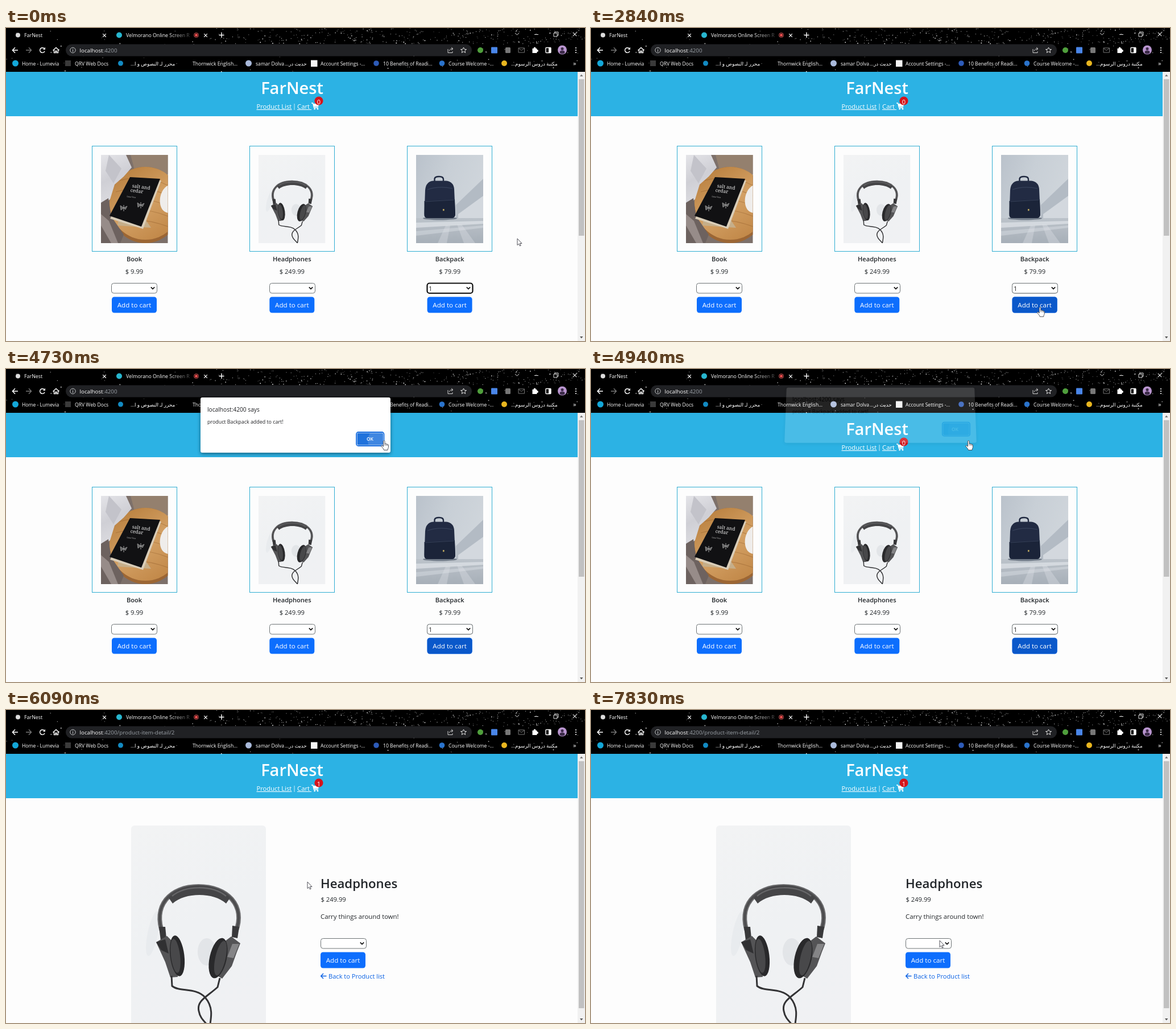
These frames come from a looping animation (1018 by 550 pixels, 8 s). An HTML page with a canvas:

```html
<!DOCTYPE html>
<html lang="en">
<head>
<meta charset="utf-8">
<title>FarNest</title>
<style>
html, body { margin: 0; width: 100%; height: 100%; overflow: hidden; background: #fdfdfd; }
canvas { display: block; }
</style>
</head>
<body>
<canvas id="stage" width="1018" height="550"></canvas>
<script>
const W = 1018, H = 550, LOOP = 8000;
const SANS = '"Open Sans", "Noto Sans", sans-serif';
const SERIF = '"Noto Serif", "Liberation Serif", serif';
const BLUE = '#0d6efd', DARK_BLUE = '#0a58ca';
const stage = document.getElementById('stage').getContext('2d');
let c = stage;

// ---- drawing helpers ----
function rect(x, y, w, h, fill) {
  c.fillStyle = fill;
  c.fillRect(x, y, w, h);
}
function round(x, y, w, h, r, fill, stroke, lw = 1) {
  c.beginPath();
  c.roundRect(x, y, w, h, r);
  if (fill) { c.fillStyle = fill; c.fill(); }
  if (stroke) { c.strokeStyle = stroke; c.lineWidth = lw; c.stroke(); }
}
function oval(x, y, rx, ry, fill, rot = 0) {
  c.beginPath();
  c.ellipse(x, y, rx, ry, rot, 0, Math.PI * 2);
  c.fillStyle = fill;
  c.fill();
}
function dot(x, y, r, fill) { oval(x, y, r, r, fill); }
function ring(x, y, r, color, lw = 1) {
  c.beginPath();
  c.arc(x, y, r, 0, Math.PI * 2);
  c.strokeStyle = color;
  c.lineWidth = lw;
  c.stroke();
}
function shape(d, fill, stroke, lw = 1) {
  const p = new Path2D(d);
  if (fill) { c.fillStyle = fill; c.fill(p); }
  if (stroke) { c.strokeStyle = stroke; c.lineWidth = lw; c.stroke(p); }
}
function text(s, x, y, size, fill, { weight = 400, align = 'left', family = SANS, dir = 'ltr' } = {}) {
  c.font = `${weight} ${size}px ${family}`;
  c.textAlign = align;
  c.direction = dir;
  c.fillStyle = fill;
  c.fillText(s, x, y);
  return c.measureText(s).width;
}
function blend(x0, y0, x1, y1, ...colors) {
  const g = c.createLinearGradient(x0, y0, x1, y1);
  colors.forEach((col, i) => g.addColorStop(i / (colors.length - 1), col));
  return g;
}
function at(x, y, sx, sy, draw) {
  c.save();
  c.translate(x, y);
  c.scale(sx, sy);
  draw();
  c.restore();
}
function sheet() {
  const cv = document.createElement('canvas');
  cv.width = W;
  cv.height = H;
  return cv;
}
function paint(cv, draw) {
  const old = c;
  c = cv.getContext('2d');
  c.clearRect(0, 0, W, H);
  draw();
  c = old;
  return cv;
}
function random(seed) {
  return () => (seed = (seed * 16807) % 2147483647) / 2147483647;
}

// ---- browser frame ----
function stars() {
  const rnd = random(4217);
  for (let i = 0; i < 430; i++) {
    const right = i < 330;
    const x = right ? 370 + rnd() * 648 : rnd() * W;
    const y = right ? rnd() * 27 : rnd() * 76;
    const s = rnd() < 0.2 ? 1.6 : 1;
    c.globalAlpha = 0.3 + rnd() * 0.65;
    rect(x, y, s, s, '#fff');
  }
  c.globalAlpha = 1;
}
function cross(x, y, r, color = '#fff') {
  shape(`M${x - r} ${y - r}L${x + r} ${y + r}M${x + r} ${y - r}L${x - r} ${y + r}`, null, color, 1.2);
}
function browser() {
  rect(0, 0, W, 77, '#000');
  stars();

  dot(21, 12.5, 4, '#dcdcdc');
  text('FarNest', 32, 16, 8.9, '#fff');
  cross(173, 13, 2.8);
  dot(199, 12.5, 5, '#27b6cf');
  text('Velmorano Online Screen R', 211, 16, 8.8, blend(285, 0, 324, 0, '#fff', 'rgba(255,255,255,.25)'));
  ring(334.5, 12.5, 4, '#e25a5a');
  dot(334.5, 12.5, 2.5, '#ef4f4f');
  cross(351, 13, 2.8);
  shape('M374.5 12.5H383.5M379 8V17', null, '#fff', 1.4);
  shape('M895 9L898.5 12L902 9M929 11.5H936', null, '#ddd', 1);
  shape('M963 9H969V15H963ZM965 9V7H971V13H969', null, '#ddd', 1);
  cross(1000, 11, 3.2, '#ddd');

  shape('M21 39H11.5M16 34.3L11.4 39L16 43.7', null, '#fff', 1.5);
  shape('M35 39H44.5M40 34.3L44.6 39L40 43.7', null, '#777', 1.3);
  c.beginPath();
  c.arc(64, 39, 4.3, 0.4, 5.5);
  c.strokeStyle = '#fff';
  c.lineWidth = 1.5;
  c.stroke();
  shape('M69 33.8V38H64.8Z', '#fff');
  shape('M82.5 39.5L88 34.5L93.5 39.5M84.5 38.5V43.5H87V40.5H89V43.5H91.5V38.5', null, '#fff', 1.4);

  round(105, 28.5, 714, 21, 10.5, '#202124');
  ring(117.5, 39, 4.7, '#c4c7c9');
  rect(117, 38.3, 1.1, 3.6, '#c4c7c9');
  rect(117, 36.2, 1.1, 1.2, '#c4c7c9');
  shape('M777 37V43.5H785V41M779.5 40.5C780 37.5 782 36.5 785 36.5M783 34L786 36.5L783 39', null, '#d0d0d0', 1);
  shape('M804.5 34L806 37.3L809.5 37.6L806.8 39.9L807.7 43.4L804.5 41.5L801.3 43.4L802.2 39.9L799.5 37.6L803 37.3Z', null, '#e0e0e0', 1);

  dot(834, 39, 5, '#4f9f3c');
  round(853, 33.5, 11, 11, 1, '#4a86e8');
  round(878, 34, 9, 10, 1.5, '#777');
  shape('M901 35H911.5V43H901ZM901 35.5L906.2 39.5L911.5 35.5', null, '#777', 1);
  rect(925.5, 36, 8, 8, '#fff');
  dot(929.5, 35.5, 1.9, '#fff');
  dot(934, 40, 1.9, '#fff');
  round(949, 34.5, 9, 9, 1, null, '#fff', 1.4);
  rect(954, 34.5, 4, 9, '#fff');
  dot(978, 38.5, 8, '#b995cf');
  dot(978, 36.5, 2.5, '#3c2b49');
  oval(978, 42.5, 4.5, 3, '#3c2b49');
  [35, 39, 43].forEach(y => dot(1002, y, 1.1, '#fff'));

  const mark = (s, x) => text(s, x, 65.5, 8.6, '#fff');
  const arabic = (s, x) => text(s, x, 65.5, 8.8, '#fff', { dir: 'rtl' });
  dot(16.5, 62, 5.5, '#13a7d8');
  mark('Home - Lumevia', 28);
  rect(104, 57, 10, 10, '#3a3a3a');
  mark('QRV Web Docs', 121);
  dot(201.5, 62, 4.5, '#128ac2');
  arabic('محرر لـ النصوص و ا...', 219);
  mark('Thornwick English...', 328);
  dot(426.5, 62, 5.5, '#a9b9da');
  mark('samar Dolva', 439);
  arabic('حديث در...', 490);
  rect(536, 56.5, 11.5, 11.5, '#f4f4f4');
  mark('Account Settings -...', 553);
  dot(651, 62, 4.8, '#2d5bb8');
  mark('10 Benefits of Readi...', 663);
  dot(766.5, 62, 4.8, '#2a73cc');
  mark('Course Welcome -...', 778);
  dot(876, 62, 5, '#e9b61f');
  arabic('مكتبة دروس الرسوم...', 888);
  text('»', 997, 66, 11, '#fff');
}

// ---- pictures ----
function clipBox(w, h) {
  c.beginPath();
  c.rect(0, 0, w, h);
  c.clip();
}
function bookPhoto() {
  clipBox(117.5, 155);
  rect(0, 0, 118, 155, '#7d706a');
  shape('M52 0H118V34L60 30Z', '#94806e');
  oval(78, 88, 63, 67, '#9c6634');
  oval(78, 85, 63, 64, blend(30, 30, 110, 150, '#b9803f', '#d3a064', '#c08646'));
  for (let i = 0; i < 5; i++) shape(`M${22 + i * 4} ${48 + i * 17}Q75 ${30 + i * 20} 118 ${54 + i * 18}`, null, 'rgba(150,95,45,.45)', 1.2);
  shape('M0 0H44L54 22L40 38L24 52L16 78L0 90Z', blend(0, 0, 40, 80, '#e4e4e8', '#cfcfd5', '#dedee2'));
  shape('M14 0L36 24L22 50L8 28Z', '#c3c3ca');
  shape('M0 84L13 76L18 108L40 140L34 155H0Z', '#6d625f');
  shape('M0 104L14 116L30 155H18L0 124Z', '#978c89');
  oval(121, 77, 17, 25, '#efedeb', 0.2);
  shape('M40 60L84 122L88 128L29 124Z', '#c6ae89');
  shape('M54 42L106 45L74 130L16 112Z', '#d9cdb8');
  shape('M51 39L104 42L71 126L15 107Z', '#111113');
  c.save();
  c.translate(55, 53);
  c.rotate(0.13);
  text('salt and', 0, 4, 8.5, '#eee', { family: SERIF });
  text('cedar', -2, 12, 8.5, '#eee', { family: SERIF });
  text('Lena Voss', -7, 22, 3.4, '#ccc', { family: SERIF });
  c.restore();
  [[40, 93], [70, 88]].forEach(([x, y]) => {
    shape(`M${x - 6} ${y - 4}L${x} ${y}L${x + 6} ${y - 3}L${x + 3} ${y + 3}L${x} ${y}L${x - 5} ${y + 4}Z`, '#666', '#aaa', 0.7);
    shape(`M${x} ${y - 5}V${y + 6}`, null, '#ccc', 0.8);
  });
}

function headphonesPhoto() {
  clipBox(237, 356);
  rect(0, 0, 237, 356, blend(0, 0, 180, 356, '#f2f3f4', '#eff1f3', '#f0f1f3'));
  oval(38, 190, 9, 40, 'rgba(205,207,214,.2)', 0.2);
  oval(133, 222, 16, 24, 'rgba(195,198,206,.3)');
  const arc = 'M56 191C37 141 68 107 118.5 107C169 107 202 140 184 187';
  shape(arc, null, '#6b6b6d', 8);
  shape(arc, null, '#4c4c4e', 4);
  shape('M66 127C90 99 146 97 174 127L167 137C145 117 95 117 73 137Z', '#454547');
  shape('M72 124C95 105 142 104 167 124', null, '#666668', 2.5);
  shape('M49 178L60 178L62 198L52 202Z', '#38383a');
  shape('M178 176L190 178L187 198L177 196Z', '#38383a');
  shape('M44 205L63 194L76 207L82 266L69 267L60 240Z', '#545456');
  shape('M44 205L60 200L66 225L53 219Z', '#303032');
  oval(81, 229, 12.5, 36, '#29292b', -0.12);
  oval(78, 229, 8, 30, '#48484a', -0.12);
  shape('M192 207L176 195L160 207L150 263L160 269L177 247L186 222Z', '#545456');
  shape('M190 208L178 208L169 231L180 233Z', '#858587');
  oval(153, 233, 15, 36, '#29292b', 0.22);
  oval(157, 233, 9, 31, '#48484a', 0.22);
  shape('M71 264L72 282C85 293 114 284 130 302C144 318 142 334 137 360', null, '#333335', 3);
  shape('M156 268L152 284C132 302 115 308 119 326C122 343 134 346 140 360', null, '#333335', 3);
}

function backpackPhoto() {
  clipBox(118, 155);
  rect(0, 0, 118, 155, blend(0, 0, 118, 40, '#bac2cb', '#c8cfd6', '#cfd5db'));
  shape('M118 42L70 88V112H118Z', '#b3bbc4');
  shape('M118 72L74 104V112H118Z', '#d3d8de');
  rect(0, 111, 118, 44, blend(0, 111, 0, 155, '#bcc3ca', '#a7afb8'));
  shape('M0 119L118 116V121L0 128Z', 'rgba(232,236,240,.6)');
  shape('M0 134L118 124V128L0 142Z', 'rgba(222,227,232,.4)');
  shape('M38 155L52 124H60L54 155ZM84 155L72 122H80L104 155Z', 'rgba(222,227,232,.35)');
  oval(42, 111.5, 30, 3, '#727c89');
  shape('M32.5 49V42Q33 38 40.5 38Q48 38 48 43V49', null, '#202940', 2.4);
  shape('M16 62Q17 47 30 45.5H53Q66 47 67 60L69 105Q68 111 62 111H20Q14 111 14.5 103Z', '#222b43');
  shape('M14.5 81L68 78L69 105Q68 111 62 111H20Q14 111 14.5 103Z', '#1b2439');
  shape('M20 61Q40 54 64 59M16 82L67 79', null, '#364159', 1.2);
  rect(47, 95, 2.6, 3.2, '#b5a15d');
}

// ---- store pages ----
const fieldX = i => Math.round(185 + i * 277.5);
const buttonX = i => 186 + i * 277.3;

function field(x, y, value, focus) {
  round(x + 0.5, y + 0.5, 80, 17.5, 4, '#fff', focus ? '#101010' : '#6e7476', focus ? 2.2 : 1);
  shape(`M${x + 69.8} ${y + 7.3}L${x + 73} ${y + 10.5}L${x + 76.2} ${y + 7.3}`, null, '#111', 1.7);
  if (value) text(value, x + 3, y + 13.5, 11, '#222');
}
function button(x, y, fill) {
  round(x, y, 79, 28, 4.5, fill);
  text('Add to cart', x + 39.5, y + 18.5, 11.6, '#fff', { align: 'center' });
}
function header() {
  rect(0, 77, 1005, 78, '#2cb2e4');
  text('FarNest', 503, 115.5, 29, '#fff', { weight: 600, align: 'center' });
  text('Product List', 440.5, 141.5, 11.2, '#fff');
  rect(440.5, 143, 62, 1, '#fff');
  text('|', 507, 141, 11, '#fff', { align: 'center' });
  text('Cart', 512, 141.5, 11.3, '#fff');
  rect(512, 143, 25, 1, '#fff');
  shape('M537 132H539.5L541.5 140H549', null, '#fff', 1.3);
  shape('M540 133H550.5L549 138.5H541.5Z', '#fff');
  dot(542.7, 142.2, 1.3, '#fff');
  dot(548, 142.2, 1.3, '#fff');
}
function scrollbar(bottom) {
  rect(1005, 77, 13, 473, '#f1f1f1');
  rect(1007, 90, 9.5, bottom - 90, '#c1c1c1');
  shape('M1009 85L1011.7 81.5L1014.5 85Z', '#777');
  shape('M1009 542L1011.7 545.5L1014.5 542Z', '#555');
}
function listPage() {
  rect(0, 77, W, 473, '#fdfdfd');
  header();
  scrollbar(365);
  const items = [['Book', '9.99', bookPhoto, 1, 1], ['Headphones', '249.99', headphonesPhoto, 117.5 / 237, 155 / 356], ['Backpack', '79.99', backpackPhoto, 1, 1]];
  items.forEach(([name, price, photo, sx, sy], i) => {
    const x = 151 + i * 277, mid = 225.5 + i * 277.3;
    c.strokeStyle = '#2fadd2';
    c.lineWidth = 1;
    c.strokeRect(x + 0.5, 207.5, 149, 185);
    at(x + 16, 223, sx, sy, photo);
    text(name, mid, 410, 11.1, '#212529', { weight: 600, align: 'center' });
    text('$ ' + price, mid, 431.5, 11.2, '#212529', { align: 'center' });
    field(fieldX(i), 448, '', false);
    button(buttonX(i), 472.5, BLUE);
  });
}
function detailPage() {
  rect(0, 77, W, 473, '#fdfdfd');
  header();
  scrollbar(524);
  c.save();
  c.beginPath();
  c.roundRect(220, 203, 237, 360, 6);
  c.clip();
  at(220, 203, 1, 1, headphonesPhoto);
  c.restore();
  text('Headphones', 553, 313, 22.2, '#212529', { weight: 600 });
  text('$ 249.99', 553.5, 337, 11.2, '#212529');
  text('Carry things around town!', 553, 367, 11.35, '#212529');
  field(553, 401, '', false);
  button(553, 425.5, BLUE);
  shape('M563.5 467.5H554M558 463L553.7 467.5L558 472', null, '#0b62e4', 1.5);
  text('Back to Product list', 567, 472, 11.1, '#0b62e4');
}

// ---- moving parts ----
function badge(n) {
  dot(550, 128, 7.6, '#d5141b');
  text(n, 550, 134, 11, '#fff', { align: 'center' });
}
function dialog(p, ripple) {
  const q = 1 - p, y = 50 - 20 * q, k = 2 * q;
  c.save();
  c.shadowColor = 'rgba(0,0,0,.45)';
  c.shadowBlur = 6;
  c.shadowOffsetY = 2;
  shape(`M${345 + k} ${y}H${673 - k}Q${676 - k} ${y} ${676 - k} ${y + 3}L${676 + k} ${y + 94}Q${676 + k} ${y + 97} ${673 + k} ${y + 97}H${345 - k}Q${342 - k} ${y + 97} ${342 - k} ${y + 94}L${342 + k} ${y + 3}Q${342 + k} ${y} ${345 + k} ${y}Z`, '#fff');
  c.restore();
  text('localhost:4200 says', 354, y + 24.5, 10.2, '#202124');
  text('product Backpack added to cart!', 354, y + 45.5, 8.9, '#202124');
  round(616 + k, y + 61, 48.5, 24, 3.5, '#fff', '#1a6fe0', 1.8);
  round(617.5 + k, y + 62.5, 45.5, 21, 2, '#1f72dc');
  if (ripple > 0) {
    c.save();
    c.beginPath();
    c.rect(617.5 + k, y + 62.5, 45.5, 21);
    c.clip();
    dot(662, y + 76, 34 * ripple, 'rgba(255,255,255,.15)');
    c.restore();
  }
  text('OK', 640, y + 76, 8.4, '#fff', { align: 'center', weight: 600 });
}
const cursors = {
  arrow: 'M0 0V11.6L2.6 9.2L4.4 13L6.2 12.2L4.5 8.5H8Z',
  hand: 'M-1.6 1.2C-1.6 -.6 1 -.6 1 1.2V5.5C2 4.6 3.2 5 3.4 6C4.5 5.3 5.6 5.8 5.7 6.8C6.8 6.4 7.5 7 7.4 8.2V11.5C7.2 13.4 6 14.2 6 16.5H-.5C-.8 14.5 -3 12.6 -5 9.8C-5.6 8.6 -4.4 8 -3.4 8.6L-1.6 10.2Z'
};
function cursor(kind, x, y) {
  at(x, y, 1, 1, () => {
    shape(cursors[kind], '#fff', '#3d3d46', 0.9);
    if (kind === 'hand') shape('M1 5.5V8.6M3.4 6V8.8M5.7 7V9', null, '#3d3d46', 0.7);
  });
}

// time, x, y
const path = [
  [0, 899, 370], [30, 899, 370], [660, 845, 439], [1480, 845, 439], [1590, 797.5, 445],
  [2260, 797.5, 445], [3060, 788, 501], [3960, 788, 501], [4470, 668, 132], [4630, 668, 132],
  [4730, 665, 126], [4950, 664, 126], [5420, 559.5, 270], [5460, 559.5, 270], [5590, 530, 302],
  [6240, 530, 302], [6520, 600, 308], [6700, 636, 352], [7450, 618, 402], [7710, 618, 402],
  [7830, 613, 405], [LOOP, 613, 405]
];
const ramp = (t, a, b) => Math.min(1, Math.max(0, (t - a) / (b - a)));
const ease = u => u * u * (3 - 2 * u);

function pointer(t) {
  const i = path.findIndex(p => p[0] > t);
  const [t0, x0, y0] = path[i - 1], [t1, x1, y1] = path[i];
  const u = ease(ramp(t, t0, t1));
  return [x0 + (x1 - x0) * u, y0 + (y1 - y0) * u];
}

const frame = sheet(), list = sheet(), detail = sheet(), popup = sheet();
function build() {
  paint(frame, browser);
  paint(list, listPage);
  paint(detail, detailPage);
}

function render(t) {
  const onDetail = t >= 5890;
  const [x, y] = pointer(t);
  const inDialog = t >= 3430 && t < 4960;
  const overButton = !onDetail && (inDialog || (x > 741 && x < 819 && y > 472 && y < 502));
  const overOk = t > 4400 && t < 4960 && x < 670;
  const overCard = !onDetail && t > 5460;

  c.drawImage(onDetail ? detail : list, 0, 0);
  c.drawImage(frame, 0, 0);
  const host = text('localhost', 129.5, 42.5, 9.8, '#fff');
  text(onDetail ? ':4200/product-item-detail/2' : ':4200', 129.5 + host, 42.5, 9.8, '#9aa0a6');
  badge(t < 4960 ? '0' : '1');
  if (!onDetail) {
    field(fieldX(2), 448, '1', t < 990);
    if (overButton) button(buttonX(2), 472.5, DARK_BLUE);
  }

  const open = ramp(t, 3420, 3600) * (1 - ramp(t, 4820, 4960));
  if (open > 0) {
    paint(popup, () => dialog(open, ramp(t, 4640, 4760)));
    c.globalAlpha = open;
    c.drawImage(popup, 0, 0);
    c.globalAlpha = 1;
  }

  const hidden = t >= 6520 && t < 6700;
  const clickable = (overButton && t < 4000) || overOk || overCard;
  if (!hidden) cursor(clickable ? 'hand' : 'arrow', x, y);
}

build();
document.fonts.ready.then(build);
const start = performance.now();
function tick() {
  render((performance.now() - start) % LOOP);
  requestAnimationFrame(tick);
}
tick();
</script>
</body>
</html>
```
